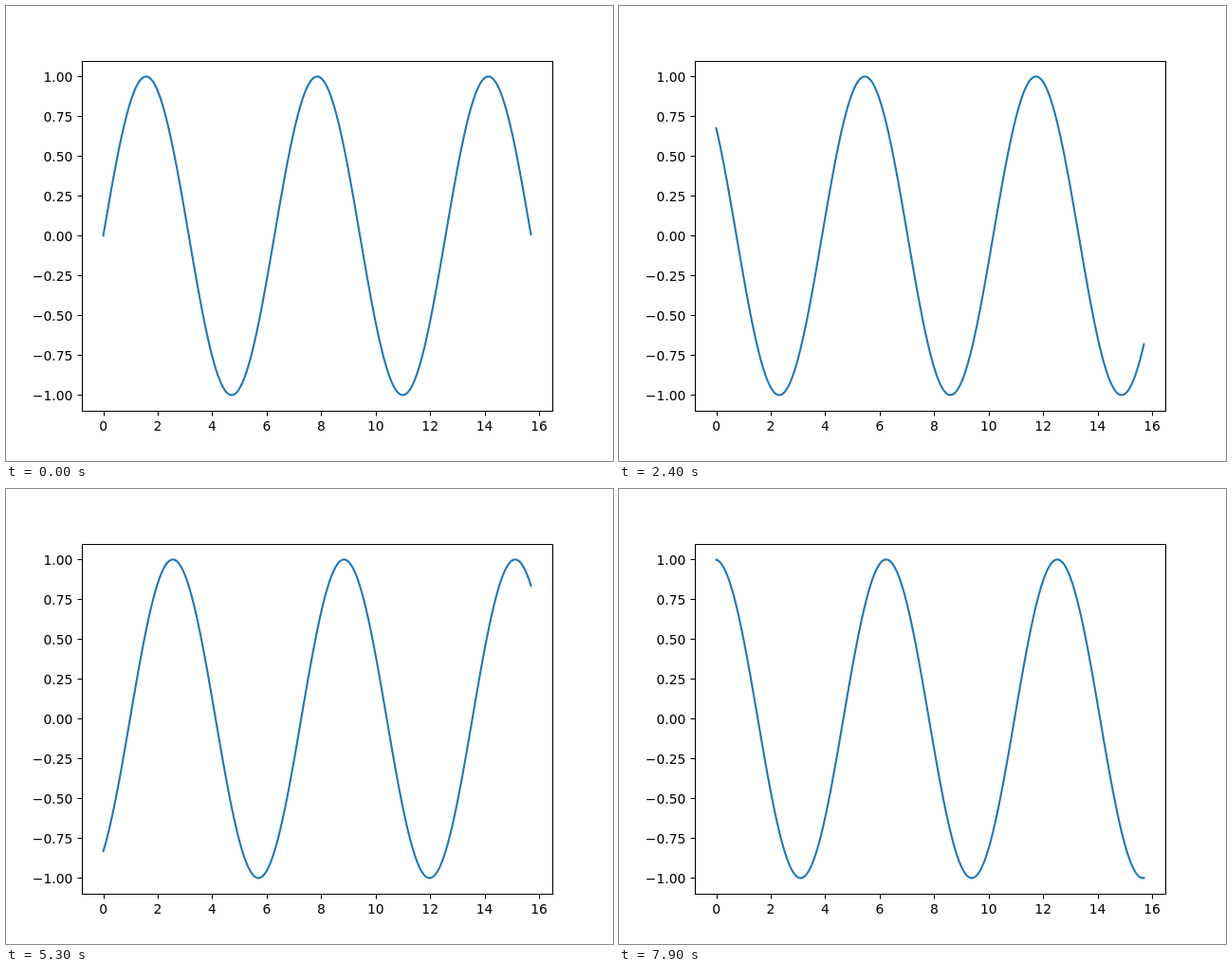
An HTML page that plays this animation: 640 px wide and 480 px high, repeating every 8 s.

```html
<!DOCTYPE html>
<html lang="en">
<head>
<meta charset="utf-8">
<title>Travelling sine wave</title>
<style>
  html, body { margin: 0; width: 100%; height: 100%; overflow: hidden; background: #fff; }
  svg { display: block; }
  text { font: 13.889px "DejaVu Sans", sans-serif; }
  path { fill: none; stroke: #000; stroke-width: 1.11; }
  #wave { stroke: #1f77b4; stroke-width: 2.083; stroke-linecap: square; stroke-linejoin: round; }
</style>
</head>
<body>
<svg width="640" height="480" viewBox="0 0 640 480">
  <path id="wave"/>
  <path id="axes" stroke-linecap="butt"/>
  <g id="labels"></g>
</svg>
<script>
const END = 15.7, STEP = 100, LOOP = 8000;
const px = x => 102.545 + x * 450.91 / END;
const py = y => 242.4 - y * 168;
const snap = v => Math.round(v) + 0.5;
const wave = document.getElementById('wave');

let axes = 'M80.5 58.5H576.5V427.5H80.5Z';
let labels = '';
const label = (x, y, anchor, text) => {
  labels += `<text x="${x}" y="${y}" text-anchor="${anchor}">${text}</text>`;
};
for (let x = 0; x <= 16; x += 2) {
  axes += `M${snap(px(x))} 427.5v5`;
  label(px(x), 448, 'middle', x);
}
for (let y = -1; y <= 1; y += 0.25) {
  axes += `M80.5 ${snap(py(y))}h-5`;
  label(70.3, Math.round(py(y) + 5.4), 'end', y.toFixed(2).replace('-', '\u2212'));
}
document.getElementById('axes').setAttribute('d', axes);
document.getElementById('labels').innerHTML = labels;

function draw() {
  const phase = Math.floor(performance.now() % LOOP / STEP) * 0.1;
  const points = [];
  for (let i = 0; i <= 785; i++) {
    const x = i * END / 785;
    points.push(px(x).toFixed(2) + ' ' + py(Math.sin(x + phase)).toFixed(2));
  }
  wave.setAttribute('d', 'M' + points.join('L'));
  requestAnimationFrame(draw);
}
draw();
</script>
</body>
</html>
```
